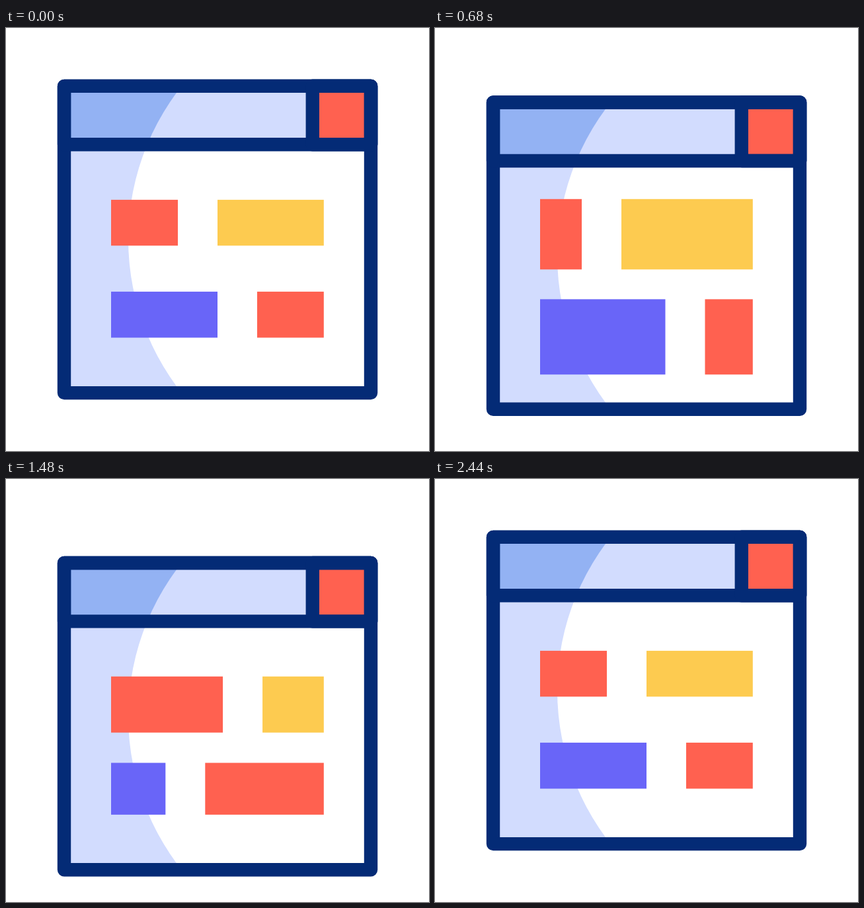
An HTML page with a canvas that plays this animation: 640 px wide and 640 px high, repeating every 2520 ms.

```html
<!DOCTYPE html>
<html lang="en">
<head>
<meta charset="utf-8">
<title>Window layout</title>
<style>
  html, body { margin: 0; width: 100%; height: 100%; overflow: hidden; background: #fff; }
  canvas { display: block; width: 640px; height: 640px; }
</style>
</head>
<body>
<canvas id="stage" width="640" height="640"></canvas>
<script>
const ctx = document.getElementById('stage').getContext('2d');
const LOOP = 2520, TICK = 40, LAST = 60;
const NAVY = '#042b76', PALE = '#d2dcfe', BLUE = '#93b2f3', WHITE = '#fff';
const RED = '#ff6150', YELLOW = '#fdcb50', PURPLE = '#6965f8';
const LEFT = 159, RIGHT = 480.8, GAP = 60;

// Cubic bezier ease (2/3, 0, 1/3, 1)
function ease(x) {
  let lo = 0, hi = 1;
  for (let i = 0; i < 30; i++) {
    const s = (lo + hi) / 2;
    if (2 * s - 3 * s * s + 2 * s * s * s < x) lo = s; else hi = s;
  }
  return lo * lo * (3 - 2 * lo);
}

function track(times, values, now) {
  let i = 0;
  while (i < times.length - 2 && now >= times[i + 1]) i++;
  const x = (now - times[i]) / (times[i + 1] - times[i]);
  const p = ease(Math.min(1, Math.max(0, x)));
  return values[i] + (values[i + 1] - values[i]) * p;
}

const drop = now => track([0, 30, 57], [0, 41.2, 0], now);
const layout = (now, rest, tall, wide) => track([0, 18, 38, 60], [rest, tall, wide, rest], now);

function box(color, x1, y1, x2, y2) {
  ctx.fillStyle = color;
  ctx.fillRect(x1, y1, x2 - x1, y2 - y1);
}

function row(top, bottom, split, leftColor, rightColor) {
  box(leftColor, LEFT, top, split, bottom);
  box(rightColor, split + GAP, top, RIGHT, bottom);
}

// Panel whose right part is lit by a large circle
function panel(top, bottom, right, shade, light) {
  ctx.save();
  ctx.beginPath();
  ctx.rect(88, top, right - 88, bottom - top);
  ctx.clip();
  box(shade, 88, top, right, bottom);
  ctx.fillStyle = light;
  ctx.beginPath();
  ctx.arc(559, 320, 374, 0, Math.PI * 2);
  ctx.fill();
  ctx.restore();
}

function draw(now) {
  box(WHITE, 0, 0, 640, 640);
  ctx.save();
  ctx.translate(0, drop(now));

  panel(176, 552, 552, PALE, WHITE);
  panel(88, 176, 464, BLUE, PALE);
  box(RED, 464, 88, 552, 176);

  row(layout(now, 259.9, 233.9, 259.9), layout(now, 329.3, 340.8, 344.6),
      layout(now, 260, 221.6, 329), RED, YELLOW);
  row(layout(now, 398.9, 385.6, 390.4), layout(now, 468.5, 500, 468.5),
      layout(now, 320, 348.8, 240.4), PURPLE, RED);

  ctx.strokeStyle = NAVY;
  ctx.lineWidth = 20.4;
  ctx.lineJoin = 'round';
  ctx.strokeRect(88, 87.9, 464, 464.2);
  ctx.strokeRect(88, 87.9, 464, 88.4);
  ctx.strokeRect(463.8, 87.8, 88.4, 88.5);
  ctx.restore();
}

function loop() {
  const time = performance.now() % LOOP;
  draw(Math.min(LAST, Math.max(0, Math.floor(time / TICK) - 1)));
  requestAnimationFrame(loop);
}
loop();
</script>
</body>
</html>
```
